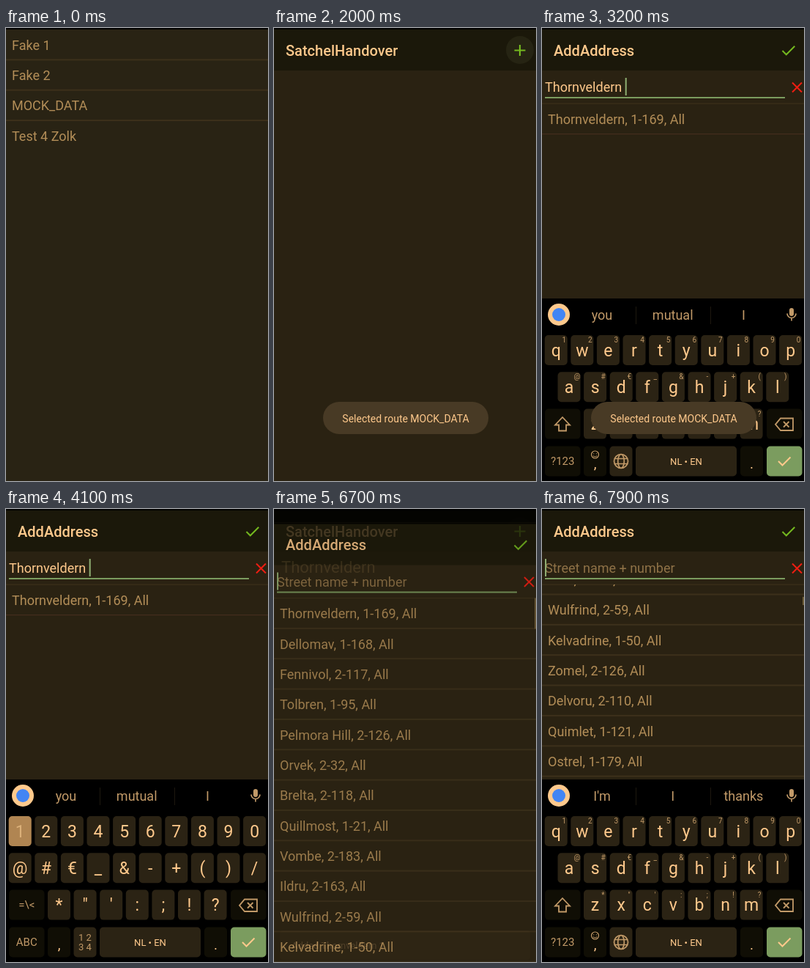
Write an HTML page that moves like this. It is 358 px wide and 618 px high and loops after 8 s.

```html
<!DOCTYPE html>
<html lang="en">
<head>
<meta charset="utf-8">
<title>Route app</title>
<style>
html, body { margin: 0; width: 100%; height: 100%; overflow: hidden; background: #000; }
svg { display: block; width: 358px; height: 618px; }
text { font-family: Roboto, "Open Sans", sans-serif; white-space: pre; }
</style>
</head>
<body>
<svg id="stage" viewBox="0 0 358 618"></svg>
<script>
const LOOP = 8000, ROW = 41.35, PITCH = 35.6, LIST_TOP = 103, KB_TOP = 369;
const BG = '#2a2212', BAR = '#1b180a', PEACH = '#ffc98c', DIM = '#b38e58', LINE = '#3c301b';
const KEY = '#2b2314', DARK_KEY = '#100e05', SOFT = '#c29a68', GREEN = '#7b9c5f', LIME = '#74b81f';
const STREET = 'Thornveldern';
const routes = ['Fake 1', 'Fake 2', 'MOCK_DATA', 'Test 4 Zolk'];
const streets = [
  STREET + ', 1-169', 'Dellomav, 1-168', 'Fennivol, 2-117', 'Tolbren, 1-95', 'Pelmora Hill, 2-126',
  'Orvek, 2-32', 'Brelta, 2-118', 'Quillmost, 1-21', 'Vombe, 2-183', 'Ildru, 2-163', 'Wulfrind, 2-59',
  'Kelvadrine, 1-50', 'Zomel, 2-126', 'Delvoru, 2-110', 'Quimlet, 1-121', 'Ostrel, 1-179', 'Jandrup, 2-84'
];

const esc = s => s.replace(/&/g, '&amp;').replace(/</g, '&lt;');
const text = (x, y, s, size, fill = PEACH, attrs = '') =>
  `<text x="${x}" y="${y}" font-size="${size}" fill="${fill}" ${attrs}>${esc(s)}</text>`;
const mid = (x, y, s, size, fill = PEACH, attrs = '') =>
  text(x, y, s, size, fill, 'text-anchor="middle" ' + attrs);
const rect = (x, y, w, h, fill, attrs = '') =>
  `<rect x="${x}" y="${y}" width="${w}" height="${h}" fill="${fill}" ${attrs}/>`;
const stroke = (d, color, width = 2) =>
  `<path d="${d}" fill="none" stroke="${color}" stroke-width="${width}"/>`;
const group = (id, body, attrs = '') => `<g id="${id}" ${attrs}>${body}</g>`;
const ripple = id => `<circle id="${id}" cx="336" cy="30" r="19" fill="#33341d" opacity="0"/>`;

const appBar = (title, icon, id) =>
  rect(0, 0, 358, 58, BAR) + rect(0, 0, 358, 2, '#000') +
  text(16, 37.5, title, 20, PEACH, 'font-weight="500"') + ripple(id) + icon;

function listRows(items, top, suffix = '') {
  return items.map((s, i) =>
    text(8, top + i * ROW + 27.7, s + suffix, 18, DIM) +
    (i < items.length - 1 ? rect(0, top + (i + 1) * ROW - 1, 358, 2, LINE) : '')).join('');
}

function key(x, y, label, w = 31, fill = KEY, size = 23, hint = '') {
  return rect(x, y, w, 41, fill, 'rx="5"') +
    mid(x + w / 2, y + 20.5 + size * .35, label, size, fill === DARK_KEY ? SOFT : PEACH) +
    (hint && mid(x + w / 2 + 11, y + 10, hint, 10, SOFT));
}
const keyRow = (chars, x, y, hints = '') =>
  [...chars].map((c, i) => key(x + i * PITCH, y, c, 31, KEY, 23, hints[i])).join('');

function keyboard() {
  const strip = (id, words) =>
    group(id, words.map((w, i) => mid(82 + i * 96.7, 397.7, w, 18, SOFT)).join(''));
  const globe = `<g fill="none" stroke="${SOFT}" stroke-width="1.7"><circle cx="108" cy="591" r="9.5"/>
    <ellipse cx="108" cy="591" rx="4.3" ry="9.5"/><path d="M99.3 587.5h17.4M99.3 594.5h17.4"/></g>`;
  const smile = `<circle cx="72.5" cy="582" r="5" fill="none" stroke="${SOFT}" stroke-width="1.2"/>` +
    stroke('M69.8 583.5q2.7 3 5.4 0M70.6 580.3v1M74.4 580.3v1', SOFT, 1.1);
  const letters =
    keyRow('qwertyuiop', 3.7, 419, '1234567890') +
    keyRow('asdfghjkl', 21.5, 469.3, '@#€_&-+()') +
    key(4, 519.6, '', 48.5, DARK_KEY) +
    stroke('M28 531l10 10.5h-5v8h-10v-8h-5z', SOFT, 1.8) +
    keyRow('zxcvbnm', 57, 519.6, '*"\':;!?') +
    key(4, 570.5, '?123', 48.5, DARK_KEY, 15) + smile + rect(92.5, 570.5, 31, 41, KEY, 'rx="5"') + globe;
  const symbols =
    keyRow('1234567890', 3.7, 419) +
    group('one', rect(3.7, 419, 31, 41, '#b08552', 'rx="5"') + mid(19.2, 447.5, '1', 23, '#dcb17a')) +
    keyRow('@#€_&-+()/', 3.7, 469.3) +
    key(4, 519.6, '=\\<', 48.5, DARK_KEY, 15) +
    keyRow('*"\':;!?', 57, 519.6) +
    key(4, 570.5, 'ABC', 48.5, DARK_KEY, 15) + rect(92.5, 570.5, 31, 41, KEY, 'rx="5"') +
    mid(108, 589, '1 2', 13, SOFT) + mid(108, 602, '3 4', 13, SOFT);
  const shared =
    rect(0, KB_TOP, 358, 300, '#000') +
    `<circle cx="23" cy="391" r="15" fill="${PEACH}"/><circle cx="23" cy="391" r="9" fill="#4285f4"/>` +
    rect(128, 380, 1, 24, '#1d180e') + rect(230, 380, 1, 24, '#1d180e') +
    rect(338, 382, 6, 11, SOFT, 'rx="3"') + stroke('M335 389.5a6 6 0 0 0 12 0M341 395.5v4', SOFT, 1.7) +
    key(307, 519.6, '', 48.5, DARK_KEY) +
    stroke('M326 532.5h17v16.5h-17l-7 -8.2zM330 537l7.5 7.5M337.5 537l-7.5 7.5', SOFT, 1.8) +
    rect(57, 570.5, 31, 41, DARK_KEY, 'rx="5"') + mid(72.5, 601, ',', 19) +
    key(128, 570.5, 'NL • EN', 138, KEY, 13) +
    rect(271, 570.5, 31, 41, DARK_KEY, 'rx="5"') + mid(286.5, 601, '.', 19) +
    rect(307, 570.5, 48.5, 41, GREEN, 'rx="5"') + stroke('M323 591l5.5 5.5l11 -11', PEACH);
  return shared + strip('words', ["I'm", 'I', 'thanks']) + strip('words2', ['you', 'mutual', 'I']) +
    group('letters', letters) + group('symbols', symbols);
}

const plus = stroke('M336 23v15M328.5 30.5h15', LIME, 2.2);
const check = stroke('M328.5 31l5.3 5.3l11.5 -11.5', LIME);
const stage = document.getElementById('stage');
stage.innerHTML =
  `<clipPath id="view">${rect(0, LIST_TOP, 358, 515, '#fff')}</clipPath>` +
  group('add', rect(0, 0, 358, 618, BG) + appBar('AddAddress', check, 'checkRipple') +
    text(4, 87, 'Street name + number', 18, '#8f7247', 'id="hint"') +
    text(4, 87, '', 18, PEACH, 'id="field"') +
    rect(4, 94, 328, 2, GREEN) + rect(0, 68, 2, 24, '#8fae72', 'id="caret"') +
    stroke('M342 74.5l13 13M355 74.5l-13 13', '#f01d12') +
    rect(0, LIST_TOP - .5, 358, 1.2, LINE) +
    rect(0, LIST_TOP + 1, 358, 40, '#56452a', 'id="pick" opacity="0"') +
    group('clip', group('list', listRows(streets, LIST_TOP, ', All')), 'clip-path="url(#view)"') +
    group('match', text(8, 130.7, streets[0] + ', All', 18, DIM) + rect(0, 144, 358, 1.2, '#432d1d')) +
    rect(356, LIST_TOP, 2, 42, '#6b5a36', 'id="thumb"')) +
  group('home', rect(0, 0, 358, 618, BG) + appBar('SatchelHandover', plus, 'plusRipple') +
    group('added', text(10, 87, STREET, 22, DIM)) +
    group('snack', rect(8, 575, 342, 40, '#42351f', 'rx="4"') + text(24, 600, `Added ${STREET} 1`, 13))) +
  group('routes', rect(0, 0, 358, 618, '#292314') + rect(0, 0, 358, 2, '#000') +
    rect(0, 85.5, 358, 40, '#56452a', 'id="tap" opacity="0"') + listRows(routes, 2)) +
  group('kb', keyboard()) +
  group('toast', rect(67, 510, 226, 44, '#483a25', 'rx="22"') + mid(180, 537.5, 'Selected route MOCK_DATA', 14));

const el = {};
stage.querySelectorAll('[id]').forEach(n => el[n.id] = n);

const ramp = (t, from, dur) => Math.min(1, Math.max(0, (t - from) / dur));
const pulse = (t, from, to) => ramp(t, from, 100) * (1 - ramp(t, to, 150));
const show = (name, on) => { el[name].style.display = on ? '' : 'none'; };
function pose(name, alpha, dy = 0) {
  show(name, alpha > 0);
  el[name].setAttribute('opacity', alpha);
  el[name].setAttribute('transform', `translate(0 ${dy})`);
}

function scrollAt(t) {
  if (t < 7300) return 25 * ramp(t, 7260, 40);
  return 25 + 375 * (1 - (1 - ramp(t, 7300, 600)) ** 1.35);
}

function draw(t) {
  const second = t >= 6000;
  const opened = second ? 6580 : 2030;

  // Screens: home fades away above the sliding address screen, then back in
  const closeRoutes = ramp(t, 1300, 200);
  pose('routes', 1 - closeRoutes, 40 * closeRoutes ** 2);
  el.tap.setAttribute('opacity', pulse(t, 1050, 1300));
  const p = ramp(t, opened, 300);
  const closing = second ? 0 : ramp(t, 5380, 250);
  pose('add', p > 0 && closing < 1 ? 1 : 0, 52 * (1 - p) ** 2 + 50 * closing ** 2);
  pose('home', Math.max(1 - p / .49, closing));
  show('added', t > 5300);
  const snack = ramp(t, 5600, 200);
  pose('snack', snack, 20 * (1 - snack) ** 2);
  el.plusRipple.setAttribute('opacity', .45 * (pulse(t, 1900, 2100) + pulse(t, 6400, 6600)));
  el.checkRipple.setAttribute('opacity', .45 * pulse(t, 5000, 5250));

  // Keyboard
  const k = ramp(t, opened + 330, 200);
  const hide = second ? 0 : ramp(t, 5300, 180);
  pose('kb', k ? Math.min(1, .4 + 1.6 * k) * (1 - hide) : 0, 37 * (1 - k) ** 2 + 60 * hide ** 2);
  const filled = t >= 3100 && !second;
  const symbols = t >= 3700 && !second;
  show('letters', !symbols);
  show('symbols', symbols);
  show('one', t >= 4050 && t < 4200);
  show('words', !filled);
  show('words2', filled);

  // Text field
  const typed = filled ? STREET + (t < 4200 ? ' ' : ' 1') : '';
  if (el.field.textContent !== typed) el.field.textContent = typed;
  show('hint', !filled);
  const since = second ? 6600 : t >= 4200 ? 4200 : t >= 3100 ? 3100 : 2030;
  show('caret', (t - since + 1000) % 1000 < 500);
  el.caret.setAttribute('x', 4 + (filled ? el.field.getComputedTextLength() : 0));

  // Suggestion list
  const scroll = scrollAt(t);
  show('clip', !filled);
  show('match', filled);
  el.pick.setAttribute('opacity', pulse(t, 2950, 3050));
  el.list.setAttribute('transform', `translate(0 ${-scroll})`);
  const view = k < 1 ? 515 : KB_TOP - LIST_TOP;
  show('thumb', !filled);
  el.thumb.setAttribute('height', view * view / 6315);
  el.thumb.setAttribute('y', LIST_TOP + scroll * view / 6315);

  pose('toast', ramp(t, 1500, 150) * (1 - ramp(t, 3500, 200)));
}

const start = performance.now();
function tick() {
  draw((performance.now() - start) % LOOP);
  requestAnimationFrame(tick);
}
tick();
</script>
</body>
</html>
```
